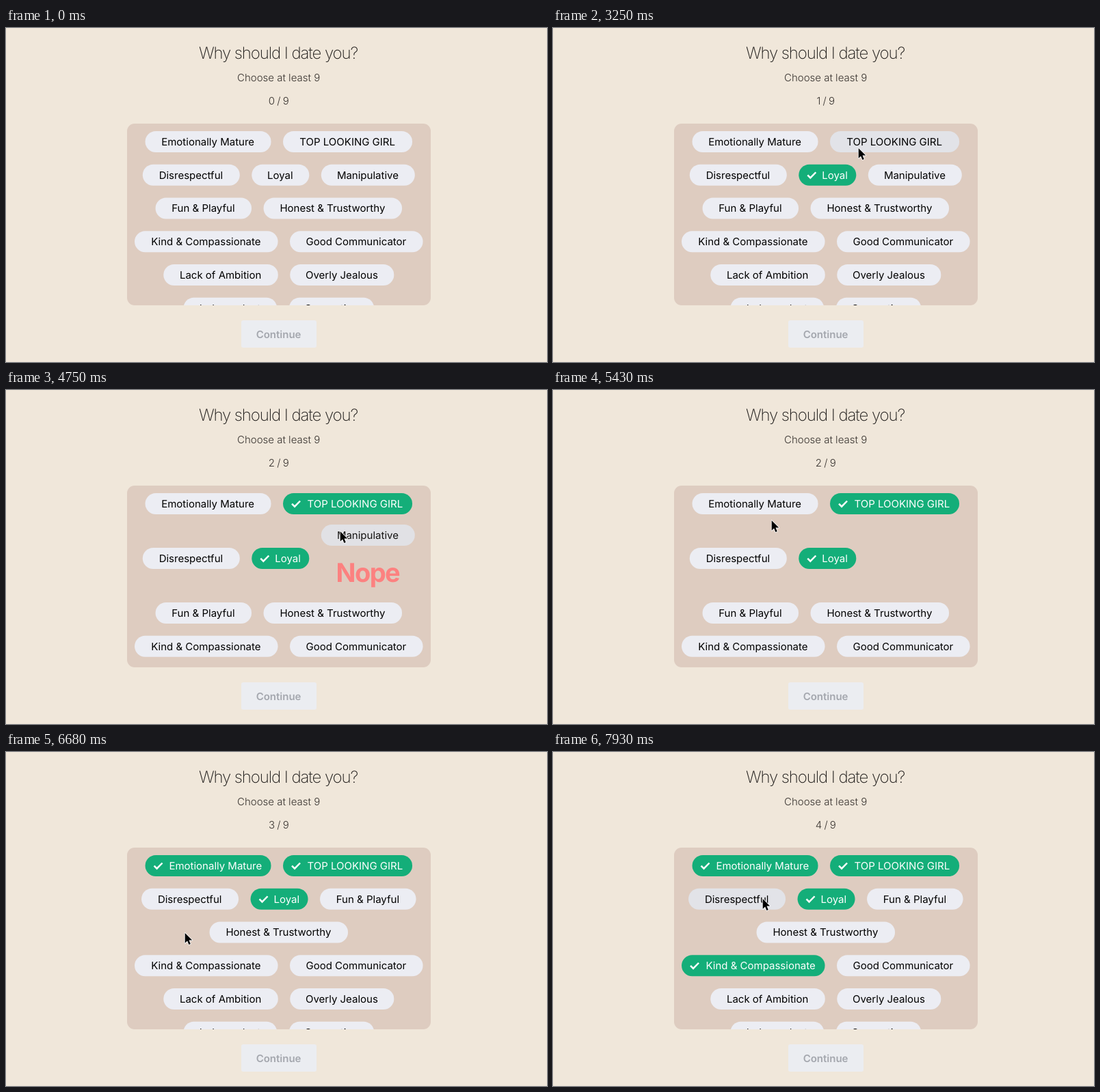
Write an HTML page that moves like this. It is 791 px wide and 489 px high and loops after 8000 ms.

```html
<!DOCTYPE html>
<html lang="en">
<head>
<meta charset="utf-8">
<title>Why should I date you?</title>
<style>
  html, body { margin: 0; width: 100%; height: 100%; overflow: hidden; background: #f0e7da; }
  svg { display: block; width: 791px; height: 489px; }
  text {
    font-family: Inter, "Open Sans", sans-serif; font-size: 15px; text-anchor: middle;
    font-optical-sizing: none; text-rendering: geometricPrecision;
  }
  .title { font-size: 24px; font-weight: 200; letter-spacing: -1.1px; fill: #1f1c1a; }
  .sub { font-weight: 300; fill: #38332f; }
  #count { word-spacing: -1px; }
  .button { font-weight: 600; fill: #a4a7ae; }
  .nope { font-size: 38px; font-weight: 700; letter-spacing: -1.6px; fill: #ff7a7a; }
</style>
</head>
<body>
<svg viewBox="0 0 791 489">
  <defs><clipPath id="clip"><rect x="177" y="140" width="444" height="266" rx="11"/></clipPath></defs>
  <rect width="791" height="489" fill="#f0e7da"/>
  <text class="title" x="398" y="45">Why should I date you?</text>
  <text class="sub" x="398.6" y="78.3">Choose at least 9</text>
  <text class="sub" id="count" x="398.8" y="111.6"></text>
  <rect x="177" y="140" width="444" height="266" rx="11" fill="#deccc0"/>
  <g id="list" clip-path="url(#clip)"></g>
  <rect x="344" y="428" width="110" height="40" rx="3" fill="#ebedf1"/>
  <text class="button" x="398.6" y="453.6">Continue</text>
  <path id="cursor" d="M.7 1V15.8L4.1 12.6L6.4 17.9L8.8 16.9L6.5 11.6H11.2Z"
        fill="#000" stroke="#fff" stroke-width="1.6" stroke-linejoin="round" paint-order="stroke"/>
</svg>
<script>
const LOOP = 8000;
const PILL_H = 31, GAP_X = 17.5, GAP_Y = 17.75, TOP = 151, MID = 398.8, MAX_W = 422;
const NOPE_H = 62.5, NOPE_AT = 4250, EXIT = [4650, 5200], REMOVE_AT = 5720;

// label, pill width, time of selection
const traits = [
  ['Emotionally Mature', 184, 5860],
  ['TOP LOOKING GIRL', 189, 3560],
  ['Disrespectful', 142],
  ['Loyal', 84, 2640],
  ['Manipulative', 137],
  ['Fun & Playful', 140.5],
  ['Honest & Trustworthy', 202.5],
  ['Kind & Compassionate', 209.5, 7120],
  ['Good Communicator', 194.5],
  ['Lack of Ambition', 167.5],
  ['Overly Jealous', 152],
  ['Independent', 137],
  ['Supportive', 124.5]
];

// time, x, y of the pointer tip
const path = [
  [850, 470, 492], [1300, 478, 330], [1870, 466, 287], [2450, 400, 217],
  [2800, 402, 217], [3250, 446, 175], [3450, 470, 168], [3850, 475, 168],
  [4200, 488, 211], [4750, 488, 206], [5050, 470, 203], [5430, 319, 190],
  [5700, 288, 170], [6100, 285, 170], [6680, 261, 264], [6950, 268, 314],
  [7350, 270, 314], [7930, 306, 214], [8000, 308, 213]
];

const $ = id => document.getElementById(id);
const set = (el, attrs) => { for (const k in attrs) el.setAttribute(k, attrs[k]); return el; };
const add = (parent, tag, attrs) =>
  parent.appendChild(set(document.createElementNS('http://www.w3.org/2000/svg', tag), attrs));
const smooth = (t, a, b) => {
  const u = Math.min(1, Math.max(0, (t - a) / (b - a)));
  return u * u * (3 - 2 * u);
};

const pills = traits.map(([label, w, at = Infinity]) => {
  const g = add($('list'), 'g', {});
  const box = add(g, 'rect', { width: w, height: PILL_H, rx: PILL_H / 2 });
  const text = add(g, 'text', { y: 20.9 });
  text.textContent = label;
  const tick = add(g, 'path', {
    d: 'M13 15.6L17 19.7L25 11.5', fill: 'none', stroke: '#fff', 'stroke-width': 2.5
  });
  return { g, box, text, tick, w, at };
});
const bad = pills[4];
const nope = add(bad.g, 'text', { class: 'nope', x: bad.w / 2 - 0.5, y: 84 });
nope.textContent = 'Nope';

function pointer(t) {
  const i = path.findIndex(p => p[0] > t);
  if (i <= 0) return path[0].slice(1);
  const [a, ax, ay] = path[i - 1], [b, bx, by] = path[i];
  const u = smooth(t, a, b);
  return [ax + (bx - ax) * u, ay + (by - ay) * u];
}

// Wraps the pills into centred rows
function layout(items, noped) {
  const rows = [];
  let row;
  for (const p of items) {
    if (!row || row.w + GAP_X + p.w > MAX_W) rows.push(row = { items: [], w: -GAP_X });
    row.items.push(p);
    row.w += GAP_X + p.w;
  }
  let y = TOP;
  for (const r of rows) {
    const extra = noped && r.items.includes(bad) ? NOPE_H : 0;
    let x = MID - r.w / 2;
    for (const p of r.items) {
      p.x = x;
      p.y = y + (p === bad ? 0 : extra / 2);
      x += p.w + GAP_X;
    }
    y += PILL_H + extra + GAP_Y;
  }
}

function draw(t) {
  const noped = t >= NOPE_AT, removed = t >= REMOVE_AT;
  const shown = removed ? pills.filter(p => p !== bad) : pills;
  layout(shown, noped);

  const exit = smooth(t, ...EXIT);
  bad.y -= 30 * exit;
  set(bad.g, { opacity: removed ? 0 : 1 - exit });
  set(nope, { visibility: noped ? 'visible' : 'hidden' });

  const [cx, cy] = pointer(t);
  set($('cursor'), { transform: `translate(${cx} ${cy})` });

  for (const p of shown) {
    const on = t >= p.at;
    const hover = cx > p.x && cx < p.x + p.w && cy > p.y && cy < p.y + PILL_H;
    set(p.g, { transform: `translate(${p.x} ${p.y})` });
    set(p.box, { fill: on ? '#14ae79' : hover ? '#e2e3e8' : '#ecedf3' });
    set(p.text, { x: p.w / 2 - 0.4 + (on ? 11.2 : 0), fill: on ? '#fff' : '#000' });
    set(p.tick, { visibility: on ? 'visible' : 'hidden' });
  }
  $('count').textContent = `${pills.filter(p => t >= p.at).length} / 9`;
}

const start = performance.now();
function tick() {
  draw((performance.now() - start) % LOOP);
  requestAnimationFrame(tick);
}
tick();
</script>
</body>
</html>
```
